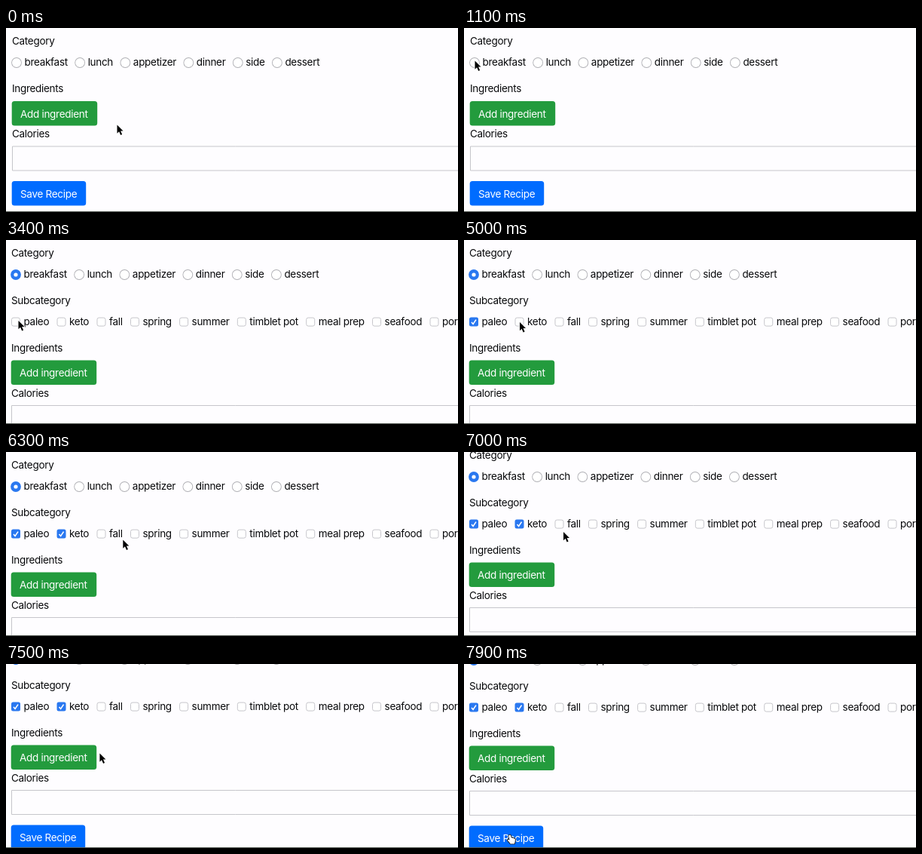
These frames come from a looping animation (600 px wide and 244 px high, 8 s). An HTML page with a canvas:

```html
<!DOCTYPE html>
<html lang="en">
<head>
<meta charset="utf-8">
<title>Recipe form</title>
<style>
  html, body { margin: 0; width: 100%; height: 100%; overflow: hidden; background: #fefdff; }
  canvas { display: block; width: 600px; height: 244px; }
</style>
</head>
<body>
<canvas id="stage"></canvas>
<script>
const W = 600, H = 244, LOOP = 8000, STEP = 100;
const PAPER = '#fefdff', INK = '#08090b', BLUE = '#006cff', CHECK = '#2a78f0';
const GREEN = '#239b3d', EDGE = '#c6c6cb';

const canvas = document.getElementById('stage');
const ratio = window.devicePixelRatio || 1;
canvas.width = W * ratio;
canvas.height = H * ratio;
const ctx = canvas.getContext('2d');

const categories = ['breakfast', 'lunch', 'appetizer', 'dinner', 'side', 'dessert'];
const tags = ['paleo', 'keto', 'fall', 'spring', 'summer', 'timblet pot', 'meal prep',
  'seafood', 'pork'];

// times of the clicks and of the new row appearing
const PRESS = 2000, CHOOSE = 2100, EXPAND = 2300, PALEO = 3800, KETO = 5300;

// pointer stops: leaves the previous stop at `from`, rests here after `to`
const home = { x: 147.5, y: 128.5 };
const stops = [
  { from: 0, to: 1100, x: 14.5, y: 43.5 },
  { from: 2300, to: 3300, x: 16.5, y: 107 },
  { from: 4500, to: 5000, x: 74, y: 109 },
  { from: 5400, to: 5800, x: 172, y: 124 },
  { from: 5900, to: 6800, x: 132, y: 106 },
  { from: 7400, to: 7900, x: 59, y: 226 }
];

const ramp = (t, from, to) => Math.min(1, Math.max(0, (t - from) / (to - from)));
const smooth = k => k * k * (3 - 2 * k);

function pointerAt(t) {
  let { x, y } = home;
  for (const stop of stops) {
    const k = smooth(ramp(t, stop.from, stop.to));
    x += (stop.x - x) * k;
    y += (stop.y - y) * k;
  }
  return [x, y];
}

// overshoots the end of the page, then settles back
const scrollAt = t => Math.floor(54 * ramp(t, 6900, 7300) - 3 * smooth(ramp(t, 7300, 7800)));

function text(str, x, y, color = INK) {
  ctx.fillStyle = color;
  ctx.fillText(str, x, y);
}

function box(x, y, w, h, r, fill, stroke) {
  ctx.beginPath();
  ctx.roundRect(x, y, w, h, r);
  ctx.fillStyle = fill;
  ctx.fill();
  if (!stroke) return;
  ctx.strokeStyle = stroke;
  ctx.lineWidth = 1;
  ctx.stroke();
}

function button(label, y, w, color) {
  box(6.7, y, w, 32.5, 3.5, color);
  text(label, 18, y + 21.5, '#fff');
}

function disc(x, y, r, color) {
  ctx.beginPath();
  ctx.arc(x, y, r, 0, Math.PI * 2);
  ctx.fillStyle = color;
  ctx.fill();
}

function radio(x, y, on, pressed) {
  disc(x, y, 6.9, on ? CHECK : '#b0b0b5');
  if (on) disc(x, y, 2.6, '#fff');
  else disc(x, y, 6, pressed ? '#e2e2e6' : '#fff');
}

function checkbox(x, y, on) {
  if (!on) return box(x - 5.5, y - 5.5, 11, 11, 2.5, '#fff', EDGE);
  box(x - 6, y - 6, 12, 12, 2.5, CHECK);
  ctx.beginPath();
  ctx.moveTo(x - 3, y + 0.3);
  ctx.lineTo(x - 0.9, y + 2.8);
  ctx.lineTo(x + 3, y - 3);
  ctx.strokeStyle = '#fff';
  ctx.lineWidth = 1.6;
  ctx.stroke();
}

// lays controls and labels out from left to right
function row(labels, y, control) {
  let x = 13;
  labels.forEach((label, i) => {
    control(x, y, i);
    text(label, x + 10.5, y + 4);
    x += 10.5 + ctx.measureText(label).width + 16.3;
  });
}

function shape(path, x, y, fill, line, width) {
  ctx.save();
  ctx.translate(x, y);
  ctx.lineJoin = 'round';
  ctx.strokeStyle = line;
  ctx.lineWidth = width;
  ctx.stroke(path);
  ctx.fillStyle = fill;
  ctx.fill(path);
  ctx.restore();
}

const arrow = new Path2D('M0 0V11.2L2.6 8.8L4.7 13.4L6.6 12.5L4.6 8.1H8Z');
const hand = new Path2D('M2 1Q3.4 0 4 1.6L4.7 4.6Q6 3.8 6.6 5Q8 4.4 8.3 5.6Q9.8 5.2 9.9 7' +
  'Q10 9.6 8.8 12.4H3.6Q2.6 10.4 .2 8.3Q-.6 6.6 1 6.7L2.5 7.6L1.5 2.4Q1.3 1.5 2 1Z');

function form(t) {
  const open = t >= EXPAND;
  const drop = open ? 62.5 : 0;
  text('Category', 7, 22);
  row(categories, 46, (x, y, i) => radio(x, y, !i && t >= CHOOSE, !i && t >= PRESS));
  if (open) {
    text('Subcategory', 7, 85);
    const checked = [t >= PALEO, t >= KETO];
    row(tags, 108.6, (x, y, i) => checkbox(x, y, checked[i]));
  }
  text('Ingredients', 7, 85 + drop);
  button('Add ingredient', 97 + drop, 113.5, GREEN);
  text('Calories', 7, 145 + drop);
  box(7.5, 157 + drop, 640, 32, 0, PAPER, EDGE);
  button('Save Recipe', 203 + drop, 98.5, BLUE);
}

function draw(t) {
  ctx.setTransform(ratio, 0, 0, ratio, 0, 0);
  ctx.fillStyle = PAPER;
  ctx.fillRect(0, 0, W, H);
  ctx.font = '13.5px Inter, "Liberation Sans", sans-serif';
  ctx.letterSpacing = '-0.3px';

  const scroll = scrollAt(t);
  ctx.save();
  ctx.translate(t < EXPAND ? 1 : 0, -scroll);
  form(t);
  ctx.restore();

  ctx.fillStyle = '#565b56';
  ctx.fillRect(0, H - 1, W, 1);

  const [x, y] = pointerAt(t);
  const overSave = x < 105 && y + scroll > 265.5;
  if (overSave) shape(hand, x - 1, y, '#fff', '#111', 1.8);
  else shape(arrow, x, y, '#000', '#fff', 1.6);
}

const start = performance.now();
function tick() {
  const t = (performance.now() - start) % LOOP;
  draw(Math.floor(t / STEP) * STEP);
  requestAnimationFrame(tick);
}
tick();
</script>
</body>
</html>
```
